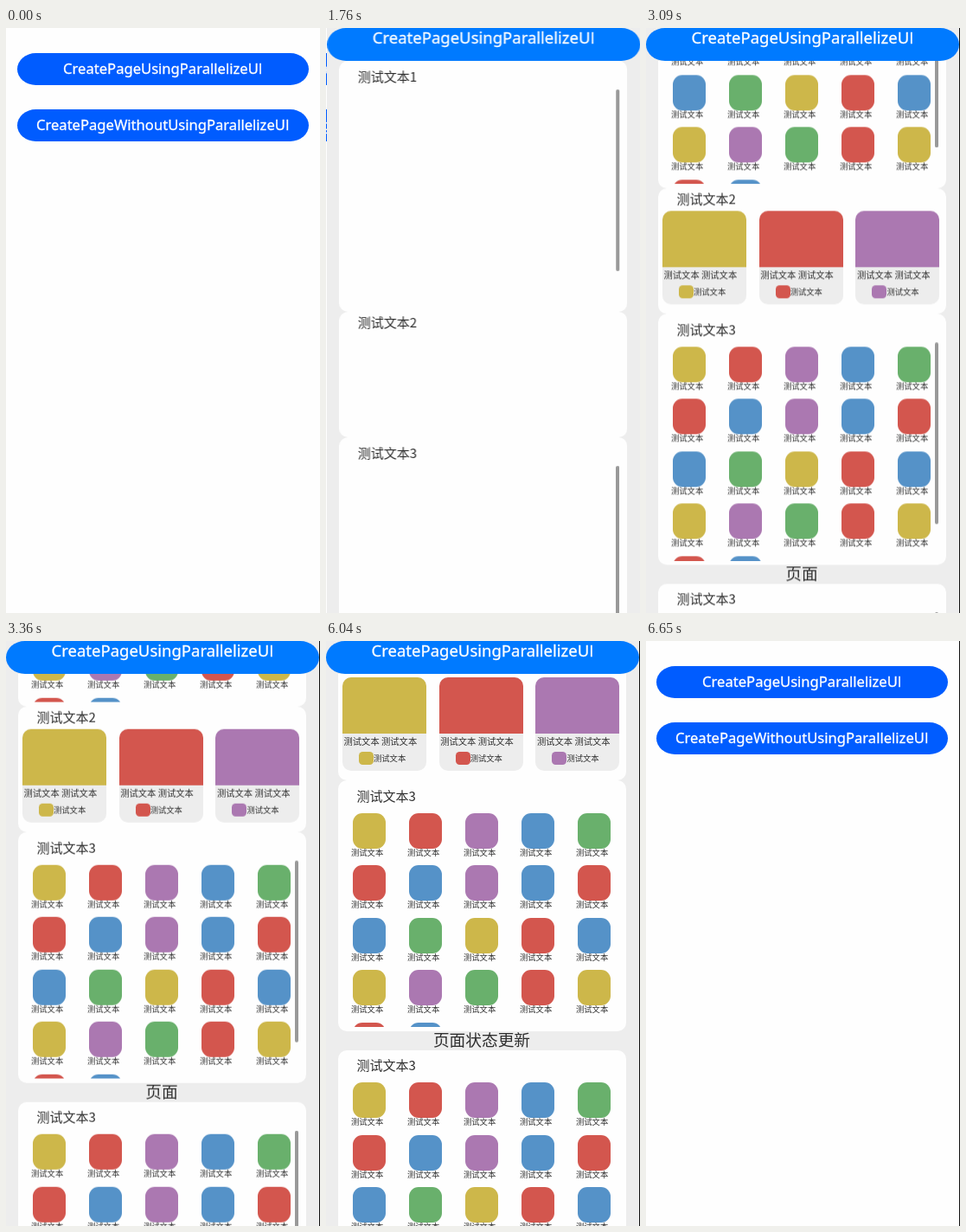
Animation, 363 px wide and 676 px high, one loop 6680 ms. Source, as an HTML page:

```html
<!DOCTYPE html>
<html lang="zh-CN">
<head>
<meta charset="utf-8">
<title>ParallelizeUI</title>
<style>
html, body { margin: 0; width: 100%; height: 100%; overflow: hidden; background: #fefefe; }
body { position: relative; font-family: "Noto Sans CJK SC", "Noto Sans CJK", sans-serif; color: #2e2e2e; }
div { position: absolute; box-sizing: border-box; white-space: nowrap; }
.loop, .home, .page, .scroll, .late, .bar, .header, .before, .after, .edge {
  animation: 6.68s linear infinite both;
}

/* start screen */
.home { inset: 0; background: #fefefe; animation-name: home; }
.shift { inset: 0; animation-name: nudge; }
.btn, .header {
  border-radius: 22px / 19px; color: #fff; text-align: center;
  font-family: "Noto Sans", sans-serif; -webkit-text-stroke: .3px #fff;
}
.btn { left: 12px; width: 336.5px; height: 37px; background: #005cff; font-size: 16.6px; line-height: 36px; }
.btn i, .header i { font-family: "Open Sans", sans-serif; font-style: normal; }

/* pushed page */
.page { inset: 0; background: #ededed; animation-name: page; }
.header { left: 0; top: 0; width: 362px; height: 38px; background: #007aff; font-size: 18.5px; line-height: 21px; animation-name: press; }
.view { left: 0; right: 0; top: 38px; bottom: 0; overflow: hidden; }
.scroll { left: 0; top: 0; width: 100%; animation-name: scroll; }
.card { left: 14px; width: 333px; border-radius: 10px; background: #fefefe; }
.title { left: 21.5px; font-size: 15px; line-height: 20px; }
.late { inset: 0; animation-name: late; }
.grid { left: 0; right: 0; top: 33px; height: 252px; overflow: hidden; }
.icon { width: 37.5px; height: 41px; border-radius: 11px; }
.label { font-size: 9.3px; line-height: 14px; }
.bar { left: 320px; top: 33px; width: 4px; height: 210px; border-radius: 2px; background: #999; animation-name: bar; }
.tile { top: 26px; width: 97px; height: 108px; border-radius: 10px; background: #ededed; overflow: hidden; }
.cover { left: 0; top: 0; width: 100%; height: 65px; }
.pair { left: 1.5px; top: 65.5px; font-size: 10.3px; line-height: 16px; }
.dot { left: 19px; top: 86px; width: 17px; height: 15px; border-radius: 4.5px; }
.state { left: 0; width: 360px; top: 722px; text-align: center; font-size: 18.7px; font-weight: 500; line-height: 24px; }
.before { animation-name: before; }
.after { animation-name: after; }
.edge { left: 362px; top: 0; width: 1px; height: 100%; background: #111; animation-name: edge; }

@keyframes nudge { 0%, 18.7% { transform: translateX(1px); } 18.71%, 100% { transform: none; } }
@keyframes home {
  0%, 22.16% { transform: none; animation-timing-function: cubic-bezier(.2, .6, .2, 1); }
  26.95%, 91.17% { transform: translateX(-30%); animation-timing-function: cubic-bezier(.2, .6, .2, 1); }
  99.1%, 100% { transform: none; }
}
@keyframes page {
  0%, 22.16% { transform: translateX(100%); animation-timing-function: cubic-bezier(.2, .6, .2, 1); }
  26.95%, 91.17% { transform: none; animation-timing-function: cubic-bezier(.2, .6, .2, 1); }
  99.1%, 100% { transform: translateX(100%); }
}
@keyframes scroll {
  0%, 40.57% { transform: none; animation-timing-function: cubic-bezier(.4, .1, .7, .5); }
  42.66% { transform: translateY(-34px); animation-timing-function: cubic-bezier(.35, .33, .7, .8); }
  50.3% { transform: translateY(-252px); animation-timing-function: cubic-bezier(.2, .7, .4, 1); }
  60.93%, 100% { transform: translateY(-312px); }
}
@keyframes late { 0%, 27.83% { opacity: 0; } 27.84%, 100% { opacity: 1; } }
@keyframes bar { 0%, 57.78% { opacity: 1; } 62.2%, 100% { opacity: 0; } }
@keyframes press { 0%, 69.8% { background: #007aff; } 70.7%, 72% { background: #006ee6; } 73.5%, 100% { background: #007aff; } }
@keyframes before { 0%, 72% { opacity: 1; } 72.01%, 100% { opacity: 0; } }
@keyframes after { 0%, 72% { opacity: 0; } 72.01%, 100% { opacity: 1; } }
@keyframes edge {
  0%, 18.7% { opacity: 0; }
  18.71%, 22.15% { opacity: 1; }
  22.16%, 26.94% { opacity: 0; }
  26.95%, 100% { opacity: 1; }
}
</style>
</head>
<body>
<div class="home">
  <div class="loop shift">
    <div class="btn" style="top:29px">CreatePageUsingParallelizeU<i>I</i></div>
    <div class="btn" style="top:94px">CreatePageWithoutUsingParallelizeU<i>I</i></div>
  </div>
</div>
<div class="page">
  <div class="view"><div class="scroll" id="list"></div></div>
  <div class="header">CreatePageUsingParallelizeU<i>I</i></div>
</div>
<div class="edge"></div>
<script>
const COLORS = { Y: '#cdb74a', R: '#d3564e', P: '#ab78b1', B: '#5592c8', G: '#69b06c' };
const ROWS = ['YRPBG', 'RBPBR', 'BGYRB', 'YPGRY', 'RB'];
const WORD = '测试文本';

const box = (cls, style, inner = '') => `<div class="${cls}" style="${style}">${inner}</div>`;
const at = (x, y) => `left:${x}px;top:${y}px;`;
const fill = key => `background:${COLORS[key]};`;

const cell = (key, col, row) => {
  const x = 17.4 + col * 65, y = 4.9 + row * 60.5;
  return box('icon', at(x, y) + fill(key)) + box('label', at(x - 2.4, y + 38), WORD);
};

const gridCard = (n, top) => {
  const cells = ROWS.map((row, r) => [...row].map((key, c) => cell(key, c, r)).join('')).join('');
  return box('card', `top:${top}px;height:290px`,
    box('title', 'top:7.5px', WORD + n) +
    box('grid', '', box('late', '', cells)) +
    box('bar', ''));
};

const tile = (key, i) => box('tile', `left:${5 + i * 111.7}px`,
  box('cover', fill(key)) +
  box('pair', '', `${WORD} ${WORD}`) +
  box('dot', fill(key)) +
  box('label', at(36, 86), WORD));

const tileCard = top => box('card', `top:${top}px;height:145px`,
  box('title', 'top:2px', WORD + 2) +
  box('late', '', [...'YRP'].map(tile).join('')));

document.getElementById('list').innerHTML =
  gridCard(1, 0) + tileCard(290) + gridCard(3, 435) +
  box('state before', '', '页面') + box('state after', '', '页面状态更新') +
  gridCard(3, 746.5);
</script>
</body>
</html>
```
